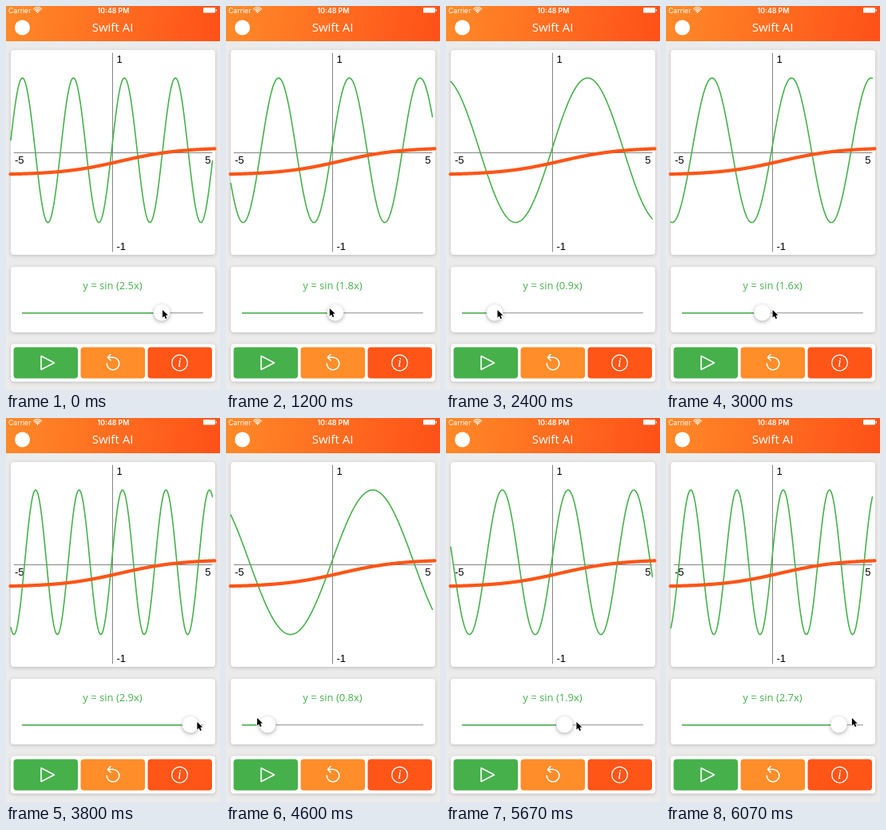
Write an HTML page with a canvas that moves like this. It is 268x480 px and loops after 6140 ms.

```html
<!DOCTYPE html>
<html lang="en">
<head>
<meta charset="utf-8">
<title>Swift AI</title>
<style>
html, body { margin: 0; width: 100%; height: 100%; overflow: hidden; background: #ebebeb; }
canvas { display: block; width: 268px; height: 480px; }
</style>
</head>
<body>
<canvas id="stage"></canvas>
<script>
const W = 268, H = 480, LOOP = 6140, STEP = 200 / 3, LAG = 82;
const GREEN = '#46b04b', ORANGE = '#ff8d29', RED = '#ff5517';
const canvas = document.getElementById('stage');
const ctx = canvas.getContext('2d');
const dpr = window.devicePixelRatio || 1;
canvas.width = W * dpr;
canvas.height = H * dpr;

// Slider drag: time, thumb x, speed in px/ms, pointer y
const drag = [
  [0, 195, 0, 380], [1200, 137, -0.1, 378], [2200, 57, 0, 380],
  [2400, 61, 0.03, 380], [3800, 231, 0.09, 380], [3900, 236, 0, 379],
  [4600, 52, -0.17, 375], [4800, 30, 0, 377], [5670, 149, 0.17, 380],
  [6070, 217, 0.19, 375]
];

function dragAt(t) {
  let i = 0;
  while (i < drag.length - 2 && t > drag[i + 1][0]) i++;
  const [t0, x0, v0, y0] = drag[i], [t1, x1, v1, y1] = drag[i + 1];
  const d = t1 - t0, u = Math.min(1, (t - t0) / d), w = 1 - u;
  const thumb = x0 * (1 + 2 * u) * w * w + x1 * u * u * (3 - 2 * u)
    + d * (v0 * u * w * w - v1 * u * u * w);
  const speed = 6 * u * w * (x1 - x0) / d + v0 * w * (1 - 3 * u) + v1 * u * (3 * u - 2);
  return { thumb, pointerX: thumb + 1 + LAG * speed, pointerY: y0 + (y1 - y0) * u };
}

function box(x, y, w, h, r, color, shadow) {
  ctx.save();
  if (shadow) {
    ctx.shadowColor = 'rgba(0,0,0,.2)';
    ctx.shadowBlur = 4 * dpr;
    ctx.shadowOffsetY = dpr;
  }
  ctx.fillStyle = color;
  ctx.beginPath();
  ctx.roundRect(x, y, w, h, r);
  ctx.fill();
  ctx.restore();
}

function disc(x, y, r, color) {
  ctx.fillStyle = color;
  ctx.beginPath();
  ctx.arc(x, y, r, 0, Math.PI * 2);
  ctx.fill();
}

function stroke(color, width) {
  ctx.strokeStyle = color;
  ctx.lineWidth = width;
  ctx.stroke();
}

function line(x0, y0, x1, y1, color, width) {
  ctx.beginPath();
  ctx.moveTo(x0, y0);
  ctx.lineTo(x1, y1);
  stroke(color, width);
}

function polygon(points) {
  ctx.beginPath();
  points.forEach(([x, y]) => ctx.lineTo(x, y));
  ctx.closePath();
}

function plot(from, to, fn, color, width) {
  ctx.beginPath();
  for (let x = from; x <= to; x += 0.5) ctx.lineTo(x, fn(x));
  stroke(color, width);
}

function text(str, x, y, font, color, align = 'left') {
  ctx.font = font;
  ctx.fillStyle = color;
  ctx.textAlign = align;
  ctx.fillText(str, x, y);
}

function drawHeader() {
  const fill = ctx.createLinearGradient(0, 0, W, 44);
  fill.addColorStop(0, '#ff8a28');
  fill.addColorStop(1, '#ff5018');
  ctx.fillStyle = fill;
  ctx.fillRect(0, 0, W, 44);

  text('Carrier', 3, 8.5, '8.7px Inter, sans-serif', '#fff');
  text('10:48 PM', 134.5, 8.5, '600 8.8px Inter, sans-serif', '#fff', 'center');
  for (const r of [2.6, 4.8, 7]) {
    ctx.beginPath();
    ctx.arc(39.5, 8.5, r, -Math.PI * 0.75, -Math.PI * 0.25);
    stroke('#fff', 1.2);
  }
  disc(39.5, 8, 0.9, '#fff');
  box(247, 2, 15, 6.5, 1, '#fff');
  box(262.7, 4, 1.2, 2.5, 0.5, '#fff');

  disc(20.5, 27, 9.5, '#fff');
  text('Swift AI', 133.5, 32, '15px "Open Sans", sans-serif', '#fff', 'center');
}

function drawGraph(k) {
  box(6, 55, 256, 256, 4, '#fff', true);
  line(10, 183.5, 258, 183.5, '#858585', 1);
  line(133.5, 59, 133.5, 307, '#858585', 1);
  const font = '13px "Liberation Sans", Arial, sans-serif';
  text('1', 138.5, 70.5, font, '#000');
  text('-1', 138.5, 305, font, '#000');
  text('-5', 11, 197, font, '#000');
  text('5', 256.5, 197, font, '#000', 'right');
  plot(6, 258.5, x => 180.3 - 90.3 * Math.sin(k * (x - 132.3) / 25.3), GREEN, 1.6);
  plot(5.5, 261.5, x => 194 - 17 * Math.tanh((x - 143) / 75), RED, 4.2);
}

function drawSlider(k, { thumb, pointerX, pointerY }) {
  box(6, 326, 256, 82, 4, '#fff', true);
  text(`y = sin (${k.toFixed(1)}x)`, 133.5, 354, '13px "Open Sans", sans-serif', GREEN, 'center');
  line(20.5, 383.7, 246.5, 383.7, '#a5a5a5', 1.2);
  line(20.5, 383.7, thumb, 383.7, GREEN, 1.4);
  ctx.save();
  ctx.shadowColor = 'rgba(0,0,0,.32)';
  ctx.shadowBlur = 5 * dpr;
  ctx.shadowOffsetY = 1.5 * dpr;
  disc(thumb, 383.3, 10.3, '#fff');
  ctx.restore();

  ctx.save();
  ctx.translate(pointerX, pointerY);
  polygon([[0, 0], [0, 9.5], [2.2, 7.5], [3.8, 11], [5.5, 10.2], [4, 6.8], [6.8, 6.6]]);
  stroke('#fff', 1.4);
  ctx.fillStyle = '#000';
  ctx.fill();
  ctx.restore();
}

function drawButtons() {
  box(6, 422.5, 256, 47, 4, '#fff', true);
  [GREEN, ORANGE, RED].forEach((color, i) => box(9.5 + 84 * i, 426.5, 80.5, 39, 4, color));

  polygon([[44, 437.5], [44, 454.5], [60.5, 446]]);
  stroke('#fff', 1.6);

  ctx.beginPath();
  ctx.arc(134, 447, 7.8, -Math.PI / 2, Math.PI);
  stroke('#fff', 1.6);
  line(134, 439.2, 128, 439.2, '#fff', 1.6);
  ctx.beginPath();
  ctx.moveTo(131, 435.5);
  ctx.lineTo(127.3, 439.2);
  ctx.lineTo(131, 442.9);
  stroke('#fff', 1.6);

  ctx.beginPath();
  ctx.arc(217.5, 446, 9.8, 0, Math.PI * 2);
  stroke('#fff', 1.3);
  text('i', 217.3, 451.3, 'italic 17px "Liberation Serif", serif', '#fff', 'center');
}

function draw(now) {
  const t = Math.floor((now % LOOP + 5) / STEP) * STEP;
  const pose = dragAt(t);
  const k = 0.5 + (pose.thumb - 29.3) / 83.3;
  ctx.setTransform(dpr, 0, 0, dpr, 0, 0);
  ctx.lineCap = ctx.lineJoin = 'round';
  ctx.fillStyle = '#ebebeb';
  ctx.fillRect(0, 0, W, H);
  drawHeader();
  drawGraph(k);
  drawSlider(k, pose);
  drawButtons();
}

const start = performance.now();
function tick() {
  draw(performance.now() - start);
  requestAnimationFrame(tick);
}
tick();
</script>
</body>
</html>
```
